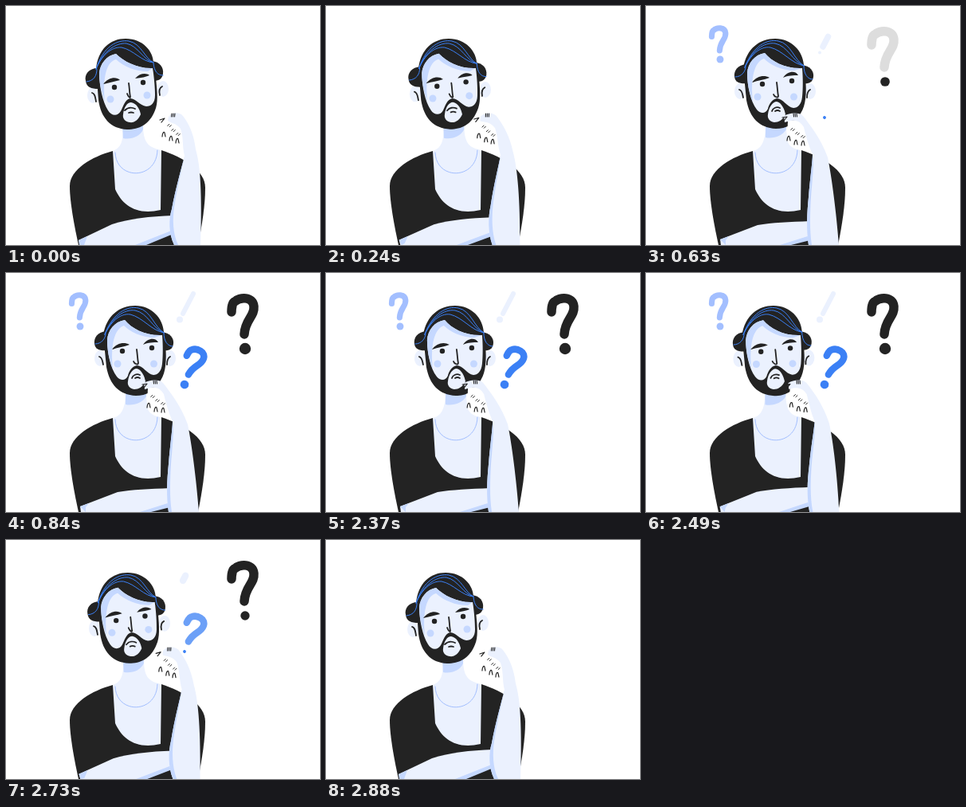
Animation of 394 by 300 pixels, one loop 2.91 s. Source, as an HTML page with a canvas:

```html
<!DOCTYPE html>
<html>
<head>
<meta charset="utf-8">
<title>Thinking</title>
<style>
html, body { margin: 0; overflow: hidden; background: #fff; }
canvas { display: block; }
</style>
</head>
<body>
<canvas id="stage" width="394" height="300"></canvas>
<script>
const ctx = document.getElementById('stage').getContext('2d');
const LOOP = 2910, STEP = 30;
const INK = '#232323', SKIN = '#ebf1fe', SHADE = '#c5d8ff', BLUE = '#3b80f5', PALE = '#a3bfff';

let pose = 0; // 0 = resting, 1 = thinking

const clamp = x => Math.max(0, Math.min(1, x));
const ramp = (t, from, to) => clamp((t - from) / (to - from));
const ease = x => x * x * (3 - 2 * x);
const mix = (a, b) => a + (b - a) * pose;

// Blends two path strings with the same structure.
function blend(a, b = a) {
  const nums = b.match(/-?\d+(\.\d+)?/g);
  let i = 0;
  return new Path2D(a.replace(/-?\d+(\.\d+)?/g, n => mix(+n, +nums[i++])));
}
function fill(color, a, b) {
  ctx.fillStyle = color;
  ctx.fill(blend(a, b));
}
function line(color, width, a, b) {
  ctx.strokeStyle = color;
  ctx.lineWidth = width;
  ctx.stroke(blend(a, b));
}
function oval(color, x, y, rx, ry = rx) {
  ctx.fillStyle = color;
  ctx.beginPath();
  ctx.ellipse(x, y, rx, ry, 0, 0, 7);
  ctx.fill();
}

function drawBody() {
  fill(INK, 'M134,182 C108,189 80,205 80,226 C80,248 87,282 91,300 L241,300 C246,275 250,250 250,228 C250,206 222,190 195,181 Z');
  fill(SKIN,
    'M146,148 C147,166 147,177 134,182 L137,230 C146,250 163,263 194,256 L195,181 C178,177 172,172 172,148 Z',
    'M150,148 C150,166 147,179 134,182 L137,230 C146,250 163,263 194,256 L195,181 C180,179 176,172 176,148 Z');
  fill(SHADE,
    'M146,148 L147,166 C157,168 168,164 172,155 L172,148 Z',
    'M150,148 L150,165 C160,167 171,163 176,155 L176,148 Z');
  line(PALE, 1, 'M137,184 C138,219 189,219 190,181');
}

function drawHead() {
  oval(SKIN, mix(109, 118), mix(112, 107), 7, 10);
  oval(SKIN, mix(197, 206), mix(104, 107), 7, 10);
  line(INK, 1.8, 'M108,109 C112,110 112,115 113,120', 'M117,105 C121,106 121,111 122,115');
  line(INK, 1.8, 'M196,101 C192,103 192,108 193,112', 'M206,105 C202,107 202,112 202,115');

  // Side hair
  fill(INK,
    'M115,78 C104,78 98,86 100,94 C101,102 107,104 116,104 Z',
    'M126,73 C114,74 110,82 111,89 C112,96 118,98 128,97 Z');
  fill(INK,
    'M183,69 C193,70 198,77 197,85 C196,92 191,94 185,94 Z',
    'M195,74 C206,75 211,82 210,89 C209,96 204,98 197,97 Z');

  // Hair and beard
  fill(INK,
    'M113,80 C115,54 131,41 150,41 C172,41 185,57 185,72 L188,90 C190,110 191,122 187,131 C180,149 167,155 152,155 C131,154 119,140 116,118 Z',
    'M122,78 C126,53 143,41 162,41 C183,41 197,57 198,74 L200,90 C202,110 200,125 195,133 C187,149 176,154 163,154 C142,153 130,140 126,118 Z');
  fill(SKIN,
    'M117,84 C118,73 126,62 138,60 C148,70 166,79 184,78 C186,90 187,104 187,112 C187,122 182,126 176,126 C168,125 163,116 156,116 C149,117 147,127 144,132 C140,139 132,138 128,131 C121,120 117,100 117,84 Z',
    'M127,84 C128,72 136,61 149,59 C158,70 175,79 196,78 C197,90 197,104 196,114 C195,124 190,128 185,128 C177,127 172,116 164,116 C158,117 154,124 153,129 C150,136 143,135 139,130 C131,120 127,100 127,84 Z');
  fill(SHADE,
    'M117,84 C118,73 126,62 138,60 C148,70 166,79 184,78 L178,82 C162,82 148,76 138,67 C126,70 121,90 124,120 C120,108 117,98 117,84 Z',
    'M127,84 C128,72 136,61 149,59 C158,70 175,79 196,78 L186,81 C170,81 156,74 148,66 C136,70 131,90 134,120 C129,108 127,96 127,84 Z');
  fill(SKIN,
    'M147,136 C148,127 152,121 157,121 C164,122 168,130 169,136 C166,143 161,147 155,146 C149,145 146,141 147,136 Z',
    'M153,136 C154,127 159,120 164,120 C170,121 174,130 175,136 C172,143 166,146 161,146 C155,145 152,141 153,136 Z');

  // Hair strands
  line(BLUE, 1, 'M113,79 C122,50 140,42 154,44 C170,47 174,66 185,71', 'M124,77 C134,50 152,41 166,44 C182,47 186,68 198,75');
  line(BLUE, 1, 'M113,79 C122,56 138,46 151,47 C166,50 172,68 185,71', 'M124,77 C133,56 148,45 162,47 C178,50 184,70 198,75');
  line(BLUE, 1, 'M113,79 C120,62 132,51 145,52 C160,55 170,70 185,71', 'M124,77 C131,62 143,50 156,52 C172,56 182,72 198,75');
  line(BLUE, 1, 'M101,95 C110,94 114,88 114,79', 'M112,89 C120,89 125,82 125,76');
  line(BLUE, 1, 'M185,72 C186,82 190,87 197,87', 'M198,75 C198,86 203,92 209,92');

  // Face
  oval(SHADE, mix(131, 140), mix(117, 114), 4.5);
  oval(SHADE, mix(177, 185.5), mix(112, 114), 4.5);
  oval(INK, mix(136, 146), mix(102, 98), 3.2);
  oval(INK, mix(172, 183), mix(96, 94), 3.2);
  fill(INK, 'M122,98 C128,90 138,88 143,93 C136,95 130,96 122,98 Z', 'M133,96 C139,88 148,86 155,90 C148,93 141,93 133,96 Z');
  fill(INK, 'M162,91 C168,84 176,84 180,87 C176,89 170,90 162,91 Z', 'M172,90 C178,81 188,81 191,87 C185,87 178,87 172,90 Z');
  line(INK, 1.8, 'M154,97 C155,103 155,110 156,114 C156,117 153,113 152,110', 'M164,96 C165,103 165,108 166,113 C166,116 161,114 160,111');
  line(INK, 1.8, 'M149,131 C153,127 158,127 162,129', 'M158,132 C159,128 164,126 168,128');
  line(INK, 1.8, 'M154,134 Q157,133 160,134', 'M162,132 Q165,130 168,132');
}

function drawArms() {
  fill(SKIN,
    'M91,294 L133,274 C155,267 180,264 210,263 L210,284 L165,300 L93,300 Z',
    'M93,293 L140,275 C158,272 180,271 206,270 L206,289 L174,300 L94,300 Z');
  fill(SHADE, 'M91,294 L102,289 L98,300 L92,300 Z', 'M93,293 L104,289 Q100,294 100,300 L94,300 Z');
  fill(SHADE, 'M162,300 L210,281 L210,286 L176,300 Z', 'M168,300 L206,288 L206,294 L182,300 Z');

  // Folded fingers, then raised arm
  fill('#fff',
    'M193,143 L216,142 L226,180 L212,179 C200,178 193,174 193,165 Z',
    'M178,144 L197,142 L211,184 L199,181 C185,180 177,176 177,165 Z');
  fill(SKIN,
    'M204,139 C208,133 218,133 222,138 C230,148 236,162 238,180 C244,200 246,235 244,300 L211,300 C204,285 204,268 208,255 C213,228 220,205 224,188 C221,176 223,165 219,154 C214,147 206,147 203,144 Z',
    'M173,138 C180,134 192,133 197,138 C208,152 220,168 228,190 C233,214 239,260 242,300 L204,300 C201,280 202,260 204,240 C206,215 209,195 209,186 C204,175 201,165 198,152 C192,141 182,143 174,146 Z');
  fill(SHADE,
    'M224,188 C220,205 213,228 208,255 C204,268 204,285 211,300 L216,300 C209,285 209,268 211,252 C215,228 220,208 224,188 Z',
    'M209,186 C209,195 206,215 204,240 C202,260 201,280 204,300 L208,300 C205,280 206,260 207,240 C209,215 211,200 209,186 Z');

  // Knuckle marks
  line(INK, 1.2, 'M193,143 L199,141 L195,146', 'M171,140 L177,139 L173,144');
  for (const d of [-2, 0, 2])
    line(INK, 1.1, `M${210 + d},135 L${209.5 + d},139`, `M${187 + d},135 L${187.5 + d},139`);
  const ticks = [[205, 150, 184, 155], [210, 156, 190, 160], [216, 161, 197, 164]];
  const tick = (x, y) => `M${x - 1},${y + 1} L${x + 1},${y - 1}`;
  for (const [x, y, u, v] of ticks)
    for (const d of [-1.2, 1.2])
      line(INK, 1, tick(x + d, y + d / 2), tick(u + d, v + d / 2));
  const knuckles = [[198, 161, 179, 166], [207, 166, 188, 171], [215, 169, 197, 172]];
  const arch = (x, y) => `M${x - 2},${y + 3} C${x - 2},${y - 1} ${x},${y - 4} ${x + 1},${y - 2} L${x + 2},${y + 3}`;
  for (const [x, y, u, v] of knuckles) line(INK, 1.2, arch(x, y), arch(u, v));
}

const HOOK = new Path2D('M-17,-46 C-17,-51 -16,-58 -13,-59 C-7,-65 10,-66 11,-53 C12,-40 0,-37 -1,-18');

function question(x, y, scale, angle, color, dot, hook) {
  ctx.save();
  ctx.translate(x, y);
  ctx.rotate(angle);
  ctx.scale(scale, scale);
  oval(color, 0, 0, 7.2 * dot);
  ctx.globalAlpha = hook;
  ctx.strokeStyle = color;
  ctx.lineWidth = 11.5;
  ctx.stroke(HOOK);
  ctx.restore();
}

function exclamation(dot, bar) {
  oval(SKIN, 218, 58.5, 4 * dot);
  if (bar) line(SKIN, 9 - 3 * bar, `M222,51 L${222 + 13 * bar},${51 - 25 * bar}`);
}

function draw(now) {
  const t = Math.floor(now % LOOP / STEP) * STEP;
  pose = t < 2370 ? ease(ramp(t, 10, 610)) : 1 - ease(ramp(t, 2340, 2900));
  // Visibility: in from a to b, out from c to d
  const show = (a, b, c, d) => ramp(t, a, b) * (1 - ramp(t, c, d));

  ctx.fillStyle = '#fff';
  ctx.fillRect(0, 0, 394, 300);
  ctx.lineCap = ctx.lineJoin = 'round';
  drawBody();
  drawHead();
  drawArms();
  question(93, 67, 0.62, 0, PALE, show(360, 510, 2490, 2660), show(540, 630, 2550, 2670));
  exclamation(show(570, 690, 2590, 2730), show(570, 690, 2640, 2760));
  question(224, 140, 0.74, 0.43, BLUE, show(590, 700, 2640, 2780), show(690, 810, 2700, 2820));
  question(300, 95, 1, 0, INK, show(500, 660, 2700, 2840), show(610, 740, 2750, 2870));
  requestAnimationFrame(() => draw(performance.now() - start));
}

const start = performance.now();
draw(0);
</script>
</body>
</html>
```
